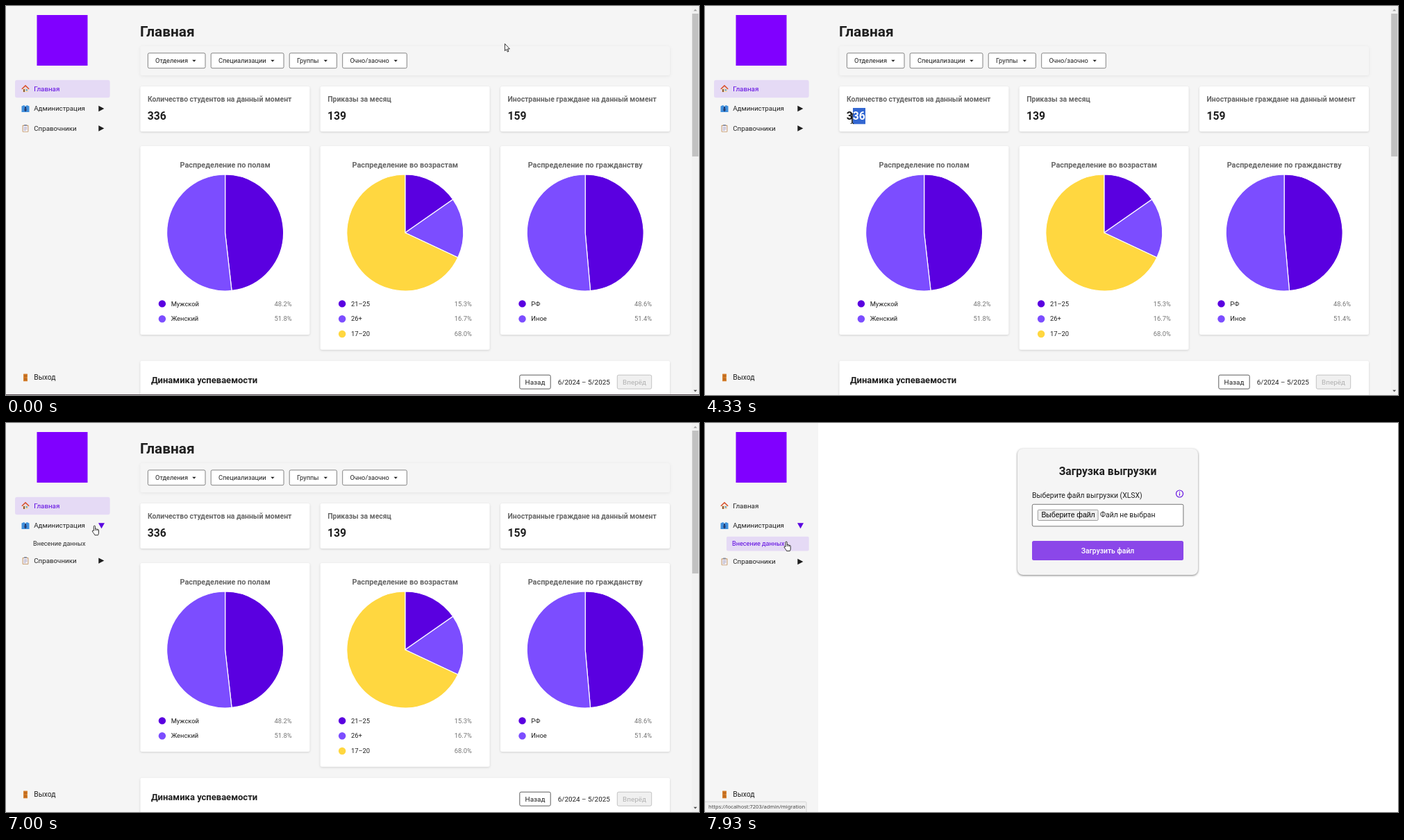
Write an HTML page that moves like this. It is 998 px wide and 561 px high and loops after 8 s.

```html
<!DOCTYPE html>
<html lang="ru">
<head>
<meta charset="utf-8">
<title>Главная</title>
<style>
  html, body { margin: 0; width: 100%; height: 100%; overflow: hidden; background: #fff; }
  svg { display: block; width: 998px; height: 561px; }
  text { font-family: Roboto, sans-serif; white-space: pre; }
  .card { filter: drop-shadow(0 1px 1.6px rgba(0, 0, 0, .15)); }
  .panel { filter: drop-shadow(0 1px 2px rgba(0, 0, 0, .07)); }
  .dialog { filter: drop-shadow(0 1.8px 1.6px rgba(0, 0, 0, .5)); }
</style>
</head>
<body>
<svg id="stage" viewBox="0 0 998 561"></svg>
<script>
const DARK = '#5a00e0', LIGHT = '#7c4dff', YELLOW = '#ffd740', INK = '#1f1f1f', PALE = '#e5daf5';
const LOOP = 8000, MENU_OPEN = 6850, NAVIGATE = 7730;

const text = (x, y, str, size, { weight = 400, fill = INK, anchor = 'start', extra = '' } = {}) =>
  `<text x="${x}" y="${y}" font-size="${size}" font-weight="${weight}" fill="${fill}" text-anchor="${anchor}" ${extra}>${str}</text>`;
const rect = (x, y, w, h, fill, r = 0, extra = '') =>
  `<rect x="${x}" y="${y}" width="${w}" height="${h}" rx="${r}" fill="${fill}" ${extra}/>`;
const path = (d, fill, extra = '') => `<path d="${d}" fill="${fill}" ${extra}/>`;
const group = (id, body, extra = '') => `<g id="${id}" ${extra}>${body}</g>`;
const card = (x, y, w, h) => rect(x, y, w, h, '#fff', 2.5, 'class="card"');
const outline = (color, width = .8) => `stroke="${color}" stroke-width="${width}"`;

function filterButton(x, w, label) {
  return rect(x, 67.9, w, 21.8, '#fff', 2, outline('#666')) +
    text(x + 10.7, 82.2, label, 9.25) +
    path(`M${x + w - 18.8} 77.8h5.4l-2.7 2.7z`, INK);
}

function statCard(x, title, value) {
  return card(x, 116, 244, 65) +
    text(x + 10.6, 137.7, title, 10.4, { weight: 700, fill: '#666' }) +
    text(x + 10.4, 164.4, value, 15.7, { weight: 700 });
}

function pieCard(x, title, slices) {
  const cx = x + 122.2, cy = 327, r = 84;
  const point = share => {
    const a = share * 2 * Math.PI;
    return `${cx + r * Math.sin(a)} ${cy - r * Math.cos(a)}`;
  };
  let out = card(x, 202, 244, 228.6 + 21.7 * slices.length) +
    text(cx, 232.8, title, 10.9, { weight: 700, fill: '#666', anchor: 'middle' });
  let start = 0;
  slices.forEach(([label, percent, color], i) => {
    const end = start + percent / 100, y = 432.5 + 21.8 * i;
    out += path(`M${cx} ${cy}L${point(start)}A${r} ${r} 0 ${percent > 50 ? 1 : 0} 1 ${point(end)}Z`,
      color, outline('#fff', 1.2)) +
      `<circle cx="${x + 31.5}" cy="${y - 3.1}" r="5.2" fill="${color}"/>` +
      text(x + 44.3, y, label, 9.4) +
      text(x + 218.2, y, percent.toFixed(1) + '%', 9.4, { fill: '#757575', anchor: 'end' });
    start = end;
  });
  return out;
}

const icons = {
  house: path('M24 119h8v5h-8z', '#f3d9b5') + path('M22.3 119.3L28 113.8l5.7 5.5-1 1-4.7-4.4-4.7 4.4z', '#d9532c') +
    rect(25, 120, 2, 4, '#8a5a3c') + rect(28.6, 120.2, 2.2, 2, '#4b9fe0'),
  shirt: path('M22.5 144.5l3.5-1.5h4l3.5 1.5v8.5h-11z', '#3f8fdd') + path('M26 143h4l-2 2.4z', '#cfe6fa') +
    path('M27.2 145h1.6l.9 5.6-1.7 2-1.7-2z', '#253b6e'),
  clipboard: rect(23.6, 171.8, 8.8, 10, '#c79a68', 1) + rect(24.6, 173, 6.8, 8, '#f3f1fa') +
    rect(26, 171, 4, 2, '#8b93a5', .6) + path('M25.7 175.2h4.6m-4.6 2h4.6m-4.6 2h3', 'none', outline('#8f8aa8', .7)),
  door: rect(25, 530.6, 6, 10.6, '#d9822f', .5) + rect(26.2, 531.8, 3.6, 3.4, '#bd6b20') +
    rect(26.2, 536.4, 3.6, 3.6, '#bd6b20') + '<circle cx="30.2" cy="536" r=".5" fill="#ffd98a"/>'
};
const arrowRight = y => path(`M133.3 ${y - 4.2}l8 4.2-8 4.2z`, INK);

const sidebar =
  rect(0, 0, 163, 561, '#f5f5f5') +
  rect(44.5, 13, 73, 73, '#8000ff') +
  rect(13, 106.7, 136.7, 25.6, PALE, 3, 'id="homeMark"') +
  icons.house + text(40.2, 122.8, 'Главная', 9.75, { extra: 'id="homeLabel"' }) +
  icons.shirt + text(40.2, 151.4, 'Администрация', 9.75) +
  group('closedMark', arrowRight(148)) +
  group('openMark', path('M133 144.3h9l-4.5 8z', DARK)) +
  group('submenu', rect(31, 163.8, 118.7, 20.6, PALE, 2, 'id="subMark"') +
    text(39, 177.2, 'Внесение данных', 9.15, { extra: 'id="subLabel"' })) +
  group('reference', icons.clipboard + text(40.2, 179.9, 'Справочники', 9.75) + arrowRight(176.5)) +
  icons.door + text(40.2, 538.8, 'Выход', 10.4);

const dashboard =
  rect(163, 0, 835, 561, '#f5f5f5') +
  text(193.1, 43.9, 'Главная', 20.8, { weight: 700 }) +
  rect(193.5, 58, 762.5, 42, '#f5f5f5', 2.5, 'class="panel"') +
  filterButton(204.4, 82.6, 'Отделения') + filterButton(295.2, 104.8, 'Специализации') +
  filterButton(408.2, 68.2, 'Группы') + filterButton(484.7, 92.6, 'Очно/заочно') +
  statCard(193.4, 'Количество студентов на данный момент', '336') +
  statCard(452.6, 'Приказы за месяц', '139') +
  statCard(712, 'Иностранные граждане на данный момент', '159') +
  pieCard(193.4, 'Распределение по полам', [['Мужской', 48.2, DARK], ['Женский', 51.8, LIGHT]]) +
  pieCard(452.6, 'Распределение во возрастам',
    [['21–25', 15.3, DARK], ['26+', 16.7, LIGHT], ['17–20', 68, YELLOW]]) +
  pieCard(712, 'Распределение по гражданству', [['РФ', 48.6, DARK], ['Иное', 51.4, LIGHT]]) +
  card(193.4, 511.8, 762.6, 80) +
  text(208.9, 544, 'Динамика успеваемости', 13, { weight: 700 }) +
  rect(739.8, 532.2, 44.4, 20, '#fff', 2, outline('#333')) +
  text(762, 545.6, 'Назад', 9.9, { anchor: 'middle' }) +
  text(832.3, 545.6, '6/2024 – 5/2025', 9.9, { anchor: 'middle' }) +
  rect(880.3, 532.2, 49.4, 20, '#f0f0f0', 2, outline('#b5b5b5')) +
  text(905, 545.6, 'Вперёд', 9.9, { fill: '#b0b0b0', anchor: 'middle' }) +
  rect(987.5, 0, 10.5, 561, '#f1f1f1') + rect(988.2, 11, 9, 206, '#c1c1c1') +
  path('M990.2 7.2h5l-2.5-2.8z', '#a3a3a3') + path('M990.2 553.8h5l-2.5 2.8z', '#505050') +
  group('selection', rect(0, 147, 0, 23.3, '#3367d1', 0, 'id="selBox"') +
    '<clipPath id="selClip"><rect id="selClipBox" y="147" width="27" height="24"/></clipPath>' +
    text(203.8, 164.4, '336', 15.7, { weight: 700, fill: '#fff', extra: 'clip-path="url(#selClip)"' })) +
  rect(110, 128, 188, 25, '#fff', 3, 'id="popup" class="card"');

const upload =
  rect(163, 0, 835, 561, '#fff') +
  rect(450, 37, 260, 182, '#f5f5f5', 8, 'class="dialog"') +
  text(580, 74.5, 'Загрузка выгрузки', 15.6, { weight: 700, anchor: 'middle' }) +
  text(471, 107.7, 'Выберите файл выгрузки (XLSX)', 10.4) +
  `<circle cx="683.5" cy="102" r="5" fill="none" ${outline(DARK, 1.1)}/>` +
  path('M683.5 101.3v3.4m0-5.6v1.1', 'none', outline(DARK, 1.1)) +
  rect(471.3, 117.3, 217.6, 31.6, '#fff', 2, outline('#555')) +
  rect(479.3, 125.3, 86.8, 15.2, '#efefef', 1.4, outline('#767676', .7)) +
  text(523, 136.4, 'Выберите файл', 10.4,
    { fill: '#000', anchor: 'middle', extra: 'style="font-family:\'Liberation Sans\',sans-serif"' }) +
  text(569, 136.4, 'Файл не выбран', 10.4) +
  rect(471, 170, 218, 28, '#8b47e9', 2.5) +
  text(580, 187.7, 'Загрузить файл', 10.35, { weight: 500, fill: '#fff', anchor: 'middle' });

const statusBar = rect(-2, 546.2, 148, 18, '#f1f1f1', 1.5, outline('#c9c9c9', .7)) +
  text(5, 556.3, 'https://localhost:7203/admin/migration', 7.5,
    { fill: '#444', extra: 'style="font-family:\'Noto Sans\',sans-serif"' });

const pointers =
  group('arrow', path('M.4.5V10.6L2.7 8.5 4.3 12.1 5.9 11.4 4.3 7.9H7.4Z', '#fff', outline('#000'))) +
  group('beam', path('M-2.3-7.5q2.3 0 2.3 1.3V5.7q0 1.3-2.3 1.3M2.3-7.5q-2.3 0-2.3 1.3V5.7q0 1.3 2.3 1.3',
    'none', outline('#000', 1))) +
  group('hand', path('M2.5 8.2V1.8a1.1 1.1 0 0 1 2.2 0V5.2q1.1-.7 1.8.4 1.1-.5 1.6.5 1.6-.4 1.6 1.2V10.6' +
    'q0 2-1 3.6H4.1Q3.4 12.4 1.2 9.9.1 8.4.8 7.8 1.6 7.2 2.5 8.2Z', '#fff', outline('#000')) +
    path('M4.7 5.2v2.6m1.8-2.2v2.2m1.6-1.7v1.9', 'none', outline('#000', .6)));

document.getElementById('stage').innerHTML =
  group('dashboard', dashboard) + group('upload', upload) + sidebar +
  rect(0, 560, 998, 1, '#5b4f55', 0, 'id="edge"') + group('status', statusBar) + group('pointer', pointers);

const $ = id => document.getElementById(id);
const show = (id, on) => $(id).setAttribute('display', on ? 'inline' : 'none');
const move = (id, x, y) => $(id).setAttribute('transform', `translate(${x} ${y})`);
const clamp = (v, lo, hi) => Math.min(hi, Math.max(lo, v));

// Pointer route: time, x, y
const route = [
  [0, 718, 54], [70, 718, 54], [130, 720, 54], [800, 720, 54], [1530, 595, 155], [1600, 573.5, 158],
  [2000, 405, 169], [2470, 255, 164], [2870, 233, 160],
  [3800, 233, 160], [4330, 212, 162.5], [4600, 204, 161],
  [5130, 204, 161], [5530, 269, 168], [5800, 269, 168], [6150, 235, 191],
  [6670, 125.5, 146], [6900, 125.5, 146], [7600, 95.5, 172.5], [7730, 95.5, 172.5], [LOOP, 117, 170]
];

const slope = (i, axis) => route[i] && route[i + 1]
  ? (route[i + 1][axis] - route[i][axis]) / (route[i + 1][0] - route[i][0]) : 0;

// Harmonic mean of neighbouring slopes: smooth motion that never overshoots
function tangent(i, axis) {
  const a = slope(i - 1, axis), b = slope(i, axis);
  return a * b > 0 ? 2 * a * b / (a + b) : 0;
}

function pointerAt(t, axis) {
  const i = route.findIndex(k => k[0] > t) - 1;
  const [a, b] = [route[i], route[i + 1]];
  const dt = b[0] - a[0], p = (t - a[0]) / dt, q = 1 - p;
  return q * q * (1 + 2 * p) * a[axis] + p * p * (1 + 2 * q) * b[axis] +
    dt * p * q * (q * tangent(i, axis) - p * tangent(i + 1, axis));
}

function draw(t) {
  const x = pointerAt(t, 1), y = pointerAt(t, 2);
  const shape = t > 6000 && x < 150 ? 'hand' : t > 3830 && t < 5500 && x < 232.5 ? 'beam' : 'arrow';
  for (const id of ['arrow', 'beam', 'hand']) show(id, id === shape);
  move('pointer', x, y);

  // Selection snaps to whole digits while dragging left
  const digits = t < 3900 || t >= MENU_OPEN ? 0 : t >= 4600 ? 3 : clamp(Math.round((231 - x) / 9), 0, 3);
  const left = 231 - 9 * digits;
  show('selection', digits > 0);
  $('selBox').setAttribute('x', left);
  $('selBox').setAttribute('width', 9 * digits);
  $('selClipBox').setAttribute('x', left);
  show('popup', t >= 4930 && t < 5330);
  show('edge', t < 3800);

  const grow = clamp((t - MENU_OPEN) / 200, 0, 1), opened = 1 - (1 - grow) ** 2;
  show('closedMark', grow === 0);
  show('openMark', grow > 0);
  $('submenu').setAttribute('opacity', opened);
  move('reference', 0, 23.5 * opened);

  const away = t >= NAVIGATE;
  show('dashboard', !away);
  show('upload', away);
  show('status', away);
  show('homeMark', !away);
  show('subMark', away);
  $('homeLabel').setAttribute('fill', away ? INK : DARK);
  $('subLabel').setAttribute('fill', away ? DARK : INK);
}

const begin = performance.now();
function tick() {
  draw(Math.max(0, performance.now() - begin) % LOOP);
  requestAnimationFrame(tick);
}
tick();
</script>
</body>
</html>
```
